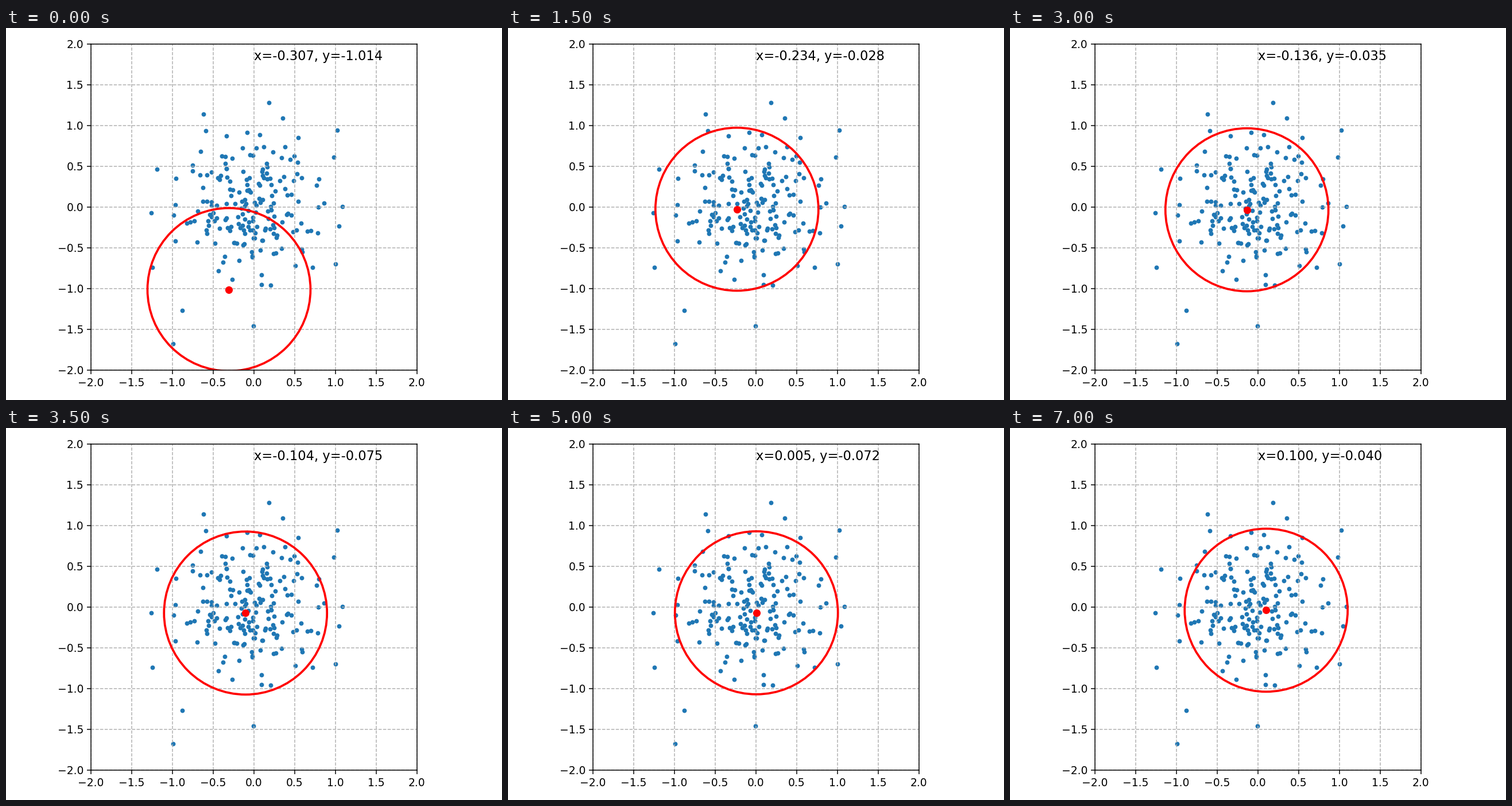
Animation, 864 px wide and 648 px high, one loop 7500 ms. Source, as a matplotlib script:

```python
import numpy as np
import matplotlib.pyplot as plt
from matplotlib.animation import FuncAnimation

DPI = 135
STEPS = 15
INTERVAL = 500
POINTS = 200
SPREAD = 0.44

plt.rcParams["font.family"] = "DejaVu Sans"

# Lone points that shape the rim of the cloud.
RIM = [(0.18, 1.28), (-0.62, 1.14), (0.35, 1.09), (1.02, 0.94),
       (0.98, 0.61), (-1.19, 0.46), (-1.26, -0.07), (-1.25, -0.74),
       (-0.88, -1.27), (-0.99, -1.68), (-0.01, -1.46), (1.00, -0.70)]

# Key positions of the centre: step, x, y.
KEYS = np.array([
    (0, -0.307, -1.014), (1, -0.279, -0.003), (3, -0.234, -0.028),
    (6, -0.136, -0.035), (7, -0.104, -0.075), (9, -0.025, -0.074),
    (12, 0.065, -0.068), (14, 0.100, -0.040),
])


def cloud(count, seed=3):
    """Normal cloud: evenly spaced radius quantiles, random angles."""
    rng = np.random.default_rng(seed)
    rank = 0.96 * (np.arange(count) + 0.5) / count
    radius = SPREAD * np.sqrt(-2 * np.log(1 - rank))
    angle = rng.uniform(0, 2 * np.pi, count)
    return np.column_stack([radius * np.cos(angle), radius * np.sin(angle)])


def centre_at(step):
    when, x, y = KEYS.T
    return np.interp(step, when, x), np.interp(step, when, y)


fig, ax = plt.subplots(figsize=(864 / DPI, 648 / DPI), dpi=DPI)
ax.set(xlim=(-2, 2), ylim=(-2, 2), aspect="equal")
ticks = np.arange(-2, 2.1, 0.5)
ax.set_xticks(ticks)
ax.set_yticks(ticks)
ax.grid(linestyle="--")

points = np.vstack([RIM, cloud(POINTS - len(RIM))])
ax.scatter(*points.T, s=10, color="C0")
circle = ax.add_patch(plt.Circle((0, 0), 1, fill=False, ec="red", lw=2,
                                 zorder=2))
dot, = ax.plot([], [], "o", color="red", markersize=6)
label = ax.text(0, 1.8, "", fontsize=12)
fig.tight_layout()


def update(step):
    x, y = centre_at(step)
    circle.center = x, y
    dot.set_data([x], [y])
    label.set_text(f"x={x:.3f}, y={y:.3f}")
    return circle, dot, label


anim = FuncAnimation(fig, update, frames=STEPS, interval=INTERVAL,
                     repeat=True, repeat_delay=0)
plt.show()
```
